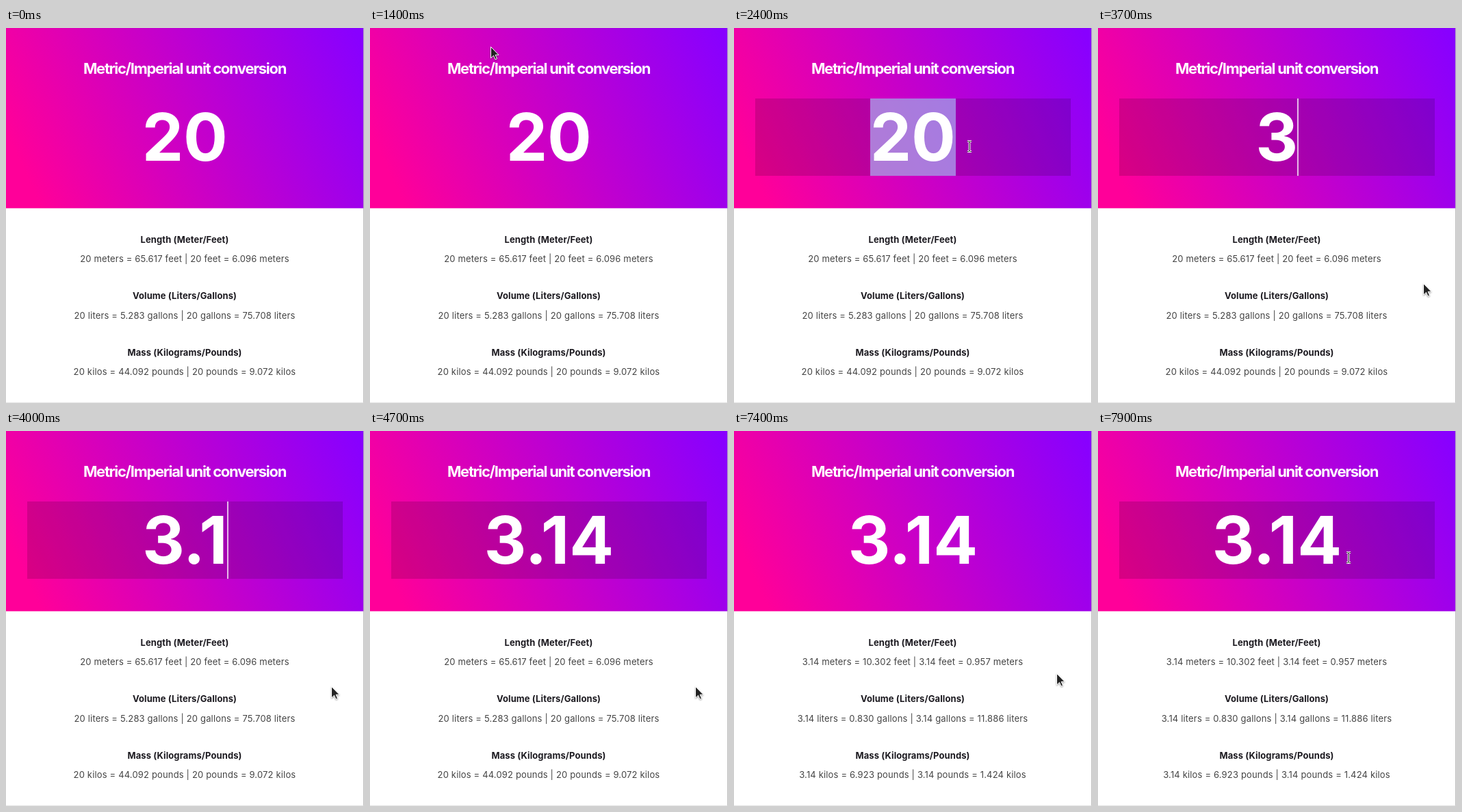
An HTML page for the animation above (8 s loop, 523 px wide and 548 px high).

```html
<!DOCTYPE html>
<html lang="en">
<head>
<meta charset="utf-8">
<title>Metric/Imperial unit conversion</title>
<style>
html, body { margin: 0; width: 100%; height: 100%; overflow: hidden; }
body { position: relative; background: #fff; font-family: Inter, sans-serif; text-align: center; }
.stage { position: absolute; left: 0; top: 0; width: 523px; height: 548px; overflow: hidden; }
.stage * { animation-duration: 8s; animation-timing-function: step-end; animation-iteration-count: infinite; }
.stage::before { content: ""; position: absolute; inset: 0; border: solid; border-width: 0 1px 1px 0; border-color: #fff #bcbcbc #e4e4e4 #fff; box-sizing: border-box; }
header { position: absolute; left: 0; top: 0; width: 522px; height: 264px; background: linear-gradient(65deg, #ff0099 8%, #8800ff 98%); }
header::after { content: ""; position: absolute; inset: auto 0 0; height: 1px; background: #fff9; }
h1, h2 { position: absolute; left: 0; width: 522px; margin: 0; white-space: nowrap; }
h1 { top: 46px; font-size: 22px; line-height: 26px; letter-spacing: -.06em; color: #fff; }
h2 { font-size: 13px; line-height: 20px; letter-spacing: .1px; color: #1c1a20; }

.field { position: absolute; left: 30.5px; top: 102.5px; width: 461.5px; height: 113px; overflow: hidden; color: #fff; font: 700 96px/113px Inter, sans-serif; animation-name: focus; }
.typed { height: 113px; animation-name: typing; }
.typed div { height: 113px; }
.typed span { position: relative; display: inline-block; height: 113px; }
.typed span::after { content: ""; position: absolute; left: 100%; top: 0; width: 2px; margin-left: -1px; height: 113px; background: #fffb; animation: caret 8s step-end infinite; }
.typed .picked { animation-name: pick; }

.value { position: absolute; left: 0; width: 522px; height: 20px; overflow: hidden; font-size: 13px; line-height: 20px; letter-spacing: .16px; color: #444; white-space: nowrap; }
.value div { height: 20px; animation-name: result; }
.value p { margin: 0; }

.pointer { position: absolute; left: 0; top: 0; overflow: visible; }
#arrow { animation-name: arrow; filter: drop-shadow(0 1px 1px #0006); }
#beam { animation-name: beam; }

@keyframes focus {
  0%, 62.5% { background: none; }
  18.75%, 97.5% { background: rgba(0, 0, 0, .15); }
}
@keyframes typing {
  0% { transform: none; }
  46.25% { transform: translateY(-100%); }
  48.75% { transform: translateY(-200%); }
  50% { transform: translateY(-300%); }
  52.5%, 100% { transform: translateY(-400%); }
}
@keyframes caret {
  0%, 30%, 58.75%, 100% { opacity: 0; }
  27.5%, 46.25% { opacity: 1; }
}
@keyframes pick {
  0%, 46.25%, 100% { background: none; }
  30% { background: rgba(170, 205, 255, .6); }
}
@keyframes result {
  0% { transform: none; }
  62.5%, 100% { transform: translateY(-100%); }
}
@keyframes arrow {
  0%, 18.75% { transform: translate(-60px, 0); }
  17.5% { transform: translate(176px, 27px); }
  35% { transform: translate(475px, 373px); }
  92.5% { transform: translate(471px, 354px); }
  95% { transform: translate(448px, 296px); }
  96.25% { transform: translate(408px, 228px); }
  97.5%, 100% { transform: translate(-60px, 0); }
}
@keyframes beam {
  0%, 35% { transform: translate(-60px, 0); }
  18.75% { transform: translate(244px, 109px); }
  20% { transform: translate(304px, 147px); }
  21.25% { transform: translate(335px, 166px); }
  22.5% { transform: translate(344px, 173px); }
  33.75% { transform: translate(374px, 200px); }
  97.5% { transform: translate(377px, 196px); }
  98.75%, 100% { transform: translate(366px, 185px); }
}
</style>
</head>
<body>
<div class="stage">
  <header>
    <h1>Metric/Imperial unit conversion</h1>
    <div class="field">
      <div class="typed">
        <div><span class="picked">20</span></div>
        <div><span>3</span></div>
        <div><span>3.</span></div>
        <div><span>3.1</span></div>
        <div><span>3.14</span></div>
      </div>
    </div>
  </header>
  <h2 style="top:299px">Length (Meter/Feet)</h2>
  <div class="value" style="top:327px"><div>
    <p>20 meters = 65.617 feet | 20 feet = 6.096 meters</p>
    <p>3.14 meters = 10.302 feet | 3.14 feet = 0.957 meters</p>
  </div></div>
  <h2 style="top:381px">Volume (Liters/Gallons)</h2>
  <div class="value" style="top:410px"><div>
    <p>20 liters = 5.283 gallons | 20 gallons = 75.708 liters</p>
    <p>3.14 liters = 0.830 gallons | 3.14 gallons = 11.886 liters</p>
  </div></div>
  <h2 style="top:464px">Mass (Kilograms/Pounds)</h2>
  <div class="value" style="top:492px"><div>
    <p>20 kilos = 44.092 pounds | 20 pounds = 9.072 kilos</p>
    <p>3.14 kilos = 6.923 pounds | 3.14 pounds = 1.424 kilos</p>
  </div></div>
  <svg class="pointer" id="arrow" width="1" height="1">
    <path d="M.5.5V17L4.500 13.300 7 19 9.500 18 7.100 12.300H12Z" fill="#222" stroke="#fff"/>
  </svg>
  <svg class="pointer" id="beam" width="1" height="1" fill="none">
    <defs><path id="bar" d="M-3-7.500H-1.500L0-6.500 1.500-7.500H3M0-6.500V6.500M-3 7.500H-1.500L0 6.500 1.500 7.500H3"/></defs>
    <use href="#bar" stroke="#fff" stroke-width="3"/>
    <use href="#bar" stroke="#111"/>
  </svg>
</div>
</body>
</html>
```
